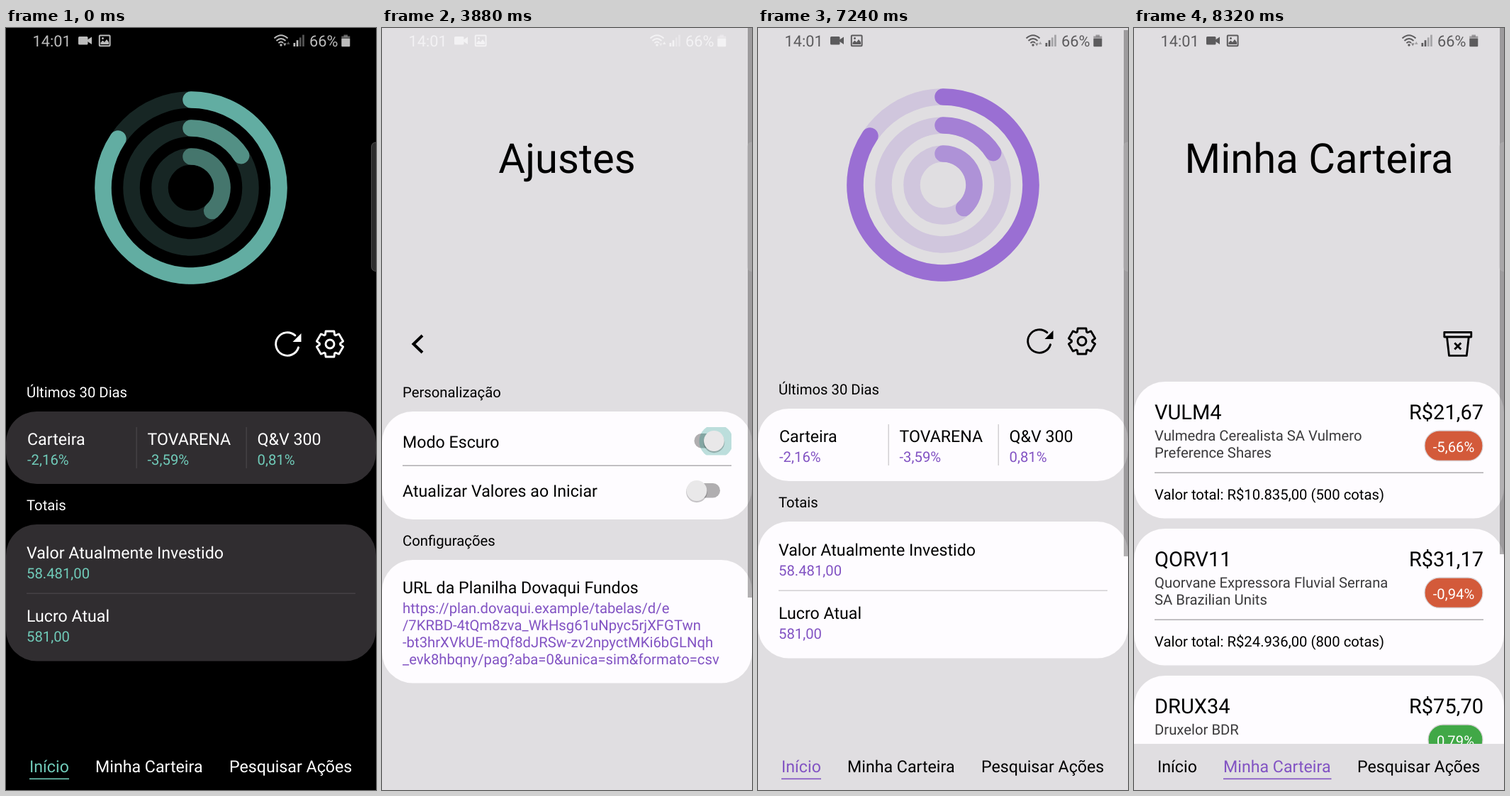
Write an HTML page that moves like this. It is 522 by 1073 pixels and loops after 9080 ms.

```html
<!DOCTYPE html>
<html lang="pt-BR">
<head>
<meta charset="utf-8">
<style>
html, body { margin: 0; width: 100%; height: 100%; overflow: hidden; background: #000; }
svg { display: block; width: 100vw; height: 100vh; font-family: Roboto, sans-serif; text-rendering: geometricPrecision; }
</style>
</head>
<body>
<svg id="stage" viewBox="0 0 522 1073"></svg>
<script>
const LOOP = 9080, STEP = 40;
const S = 20.3, M = 23.2, L = 29, XL = 58;   // text sizes
const DARK = {
  bg: '#000', card: '#302d30', ink: '#fff', accent: '#70cbb9', line: '#464346', rule: '#777578',
  rings: ['#62ada2', '#539085', '#45766d'], track: '#172624', status: '#bcbcbc',
  slot: '#201f21', bar: 0.2
};
const LIGHT = {
  bg: '#e0dee1', card: '#fefcff', ink: '#000', accent: '#8253c3', line: '#cfcdd0', rule: '#a9a7aa',
  rings: ['#9a6fd3', '#a480d5', '#ae92d7'], track: '#d0c6dd', status: '#5c5b5d',
  slot: '#b0aeb0', bar: 0.3
};
const RINGS_FROM = [295.7, 63.7, 295.4], RINGS_TO = [303.8, 57.3, 137.7];
const stage = document.getElementById('stage');
let c = DARK;

const clamp = x => Math.max(0, Math.min(1, x));
const mix = (a, b, p) => a + (b - a) * p;
const polar = (x, y, r, deg) => {
  const a = deg * Math.PI / 180;
  return `${(x + r * Math.sin(a)).toFixed(2)},${(y - r * Math.cos(a)).toFixed(2)}`;
};

const text = (s, x, y, size, fill = c.ink, more = '') =>
  `<text x="${x}" y="${y}" font-size="${size}" fill="${fill}" ${more}>${s.replace(/&/g, '&amp;')}</text>`;
const rect = (x, y, w, h, fill, r = 0, more = '') =>
  `<rect x="${x}" y="${y}" width="${w}" height="${h}" rx="${r}" fill="${fill}" ${more}/>`;
const disc = (x, y, r, fill, more = '') => `<circle cx="${x}" cy="${y}" r="${r}" fill="${fill}" ${more}/>`;
const stroke = (d, w, color = c.ink, more = '') =>
  `<path d="${d}" fill="none" stroke="${color}" stroke-width="${w}" ${more}/>`;
const group = (s, dy) => `<g transform="translate(0 ${dy})">${s}</g>`;
const card = (y, h) => rect(0, y, 522, h, c.card, 43.5);
const rule = (y, color) => rect(29, y, 464, 1.4, color);
const scrollbar = (y, h) => rect(516, y, 6, h, '#000', 0, `opacity="${c.bar}"`);
const title = s => text(s, 261, 204, XL, c.ink, 'text-anchor="middle"');

function rings(p) {
  return c.rings.map((color, i) => {
    const r = 124 - 40 * i, end = mix(RINGS_FROM[i], RINGS_TO[i], p);
    const arc = `M261,${225 - r}A${r},${r} 0 ${end > 180 ? 1 : 0} 1 ${polar(261, 225, r, end)}`;
    return disc(261, 225, r, 'none', `stroke="${c.track}" stroke-width="23.5"`) +
      stroke(arc, 23.5, color, 'stroke-linecap="round"');
  }).join('');
}

function gear(x, y) {
  const pts = [];
  for (let a = 0; a < 360; a += 60)
    pts.push(polar(x, y, 14.6, a - 27), polar(x, y, 19, a - 18), polar(x, y, 19, a + 18), polar(x, y, 14.6, a + 27));
  return stroke(`M${pts.join('L')}Z`, 2.9, c.ink, 'stroke-linejoin="round"') +
    stroke(`M${x - 6},${y}a6,6 0 1 1 12,0a6,6 0 1 1 -12,0`, 2.9);
}

const refresh = () =>
  stroke(`M${polar(397, 445, 16.3, 107)}A16.3,16.3 0 1 1 ${polar(397, 445, 16.3, 42)}`, 2.9, c.ink, 'stroke-linecap="round"') +
  `<path d="M416.5,430V442H404.5Z" fill="${c.ink}"/>`;

function home(t, scroll) {
  const loaded = !(t >= 5680 && t < 5760);
  const values = loaded ? ['-2,16%', '-3,59%', '0,81%', '58.481,00', '581,00']
                        : ['0,00%', '-3,59%', '0,00%', '0,00', '0,00'];
  const p = t < 5680 ? 1 : clamp((t - 5720) / 120);
  const columns = ['Carteira', 'TOVARENA', 'Q&V 300'].map((name, i) => {
    const x = [30, 199.5, 354.5][i];
    return text(name, x, 587, M) + text(values[i], x, 615, S, c.accent) +
      (i ? rect(x - 16, 562, 1.4, 58, c.line) : '');
  }).join('');
  const page = rings(p) + refresh() + gear(457, 445) +
    text('Resumo', 29, 460, 36.25, c.ink, `opacity="${scroll ? clamp((t - 7400) / 200) : 0}"`) +
    text('Últimos 30 Dias', 29, 520, S) + card(540, 102) + columns +
    text('Totais', 29, 679, S) + card(699, 192.5) +
    text('Valor Atualmente Investido', 29, 747, M) + text(values[3], 29, 775, S, c.accent) +
    rule(795.5, c.line) +
    text('Lucro Atual', 29, 836, M) + text(values[4], 29, 864, S, c.accent);
  return group(page, -scroll) + (t < 2400 ? '' : scrollbar(scroll * 266 / 363, 741));
}

function toggle(y, pos, ripple = 0) {
  const x = mix(444, 473.5, pos), lit = pos === 1;
  const glow = ripple > 0
    ? `<clipPath id="rip"><rect x="420" y="${y - 20}" width="73" height="39.5"/></clipPath>` +
      disc(x + 3, y, 24, '#0f8f80', `opacity="${0.28 * ripple}" clip-path="url(#rip)"`) : '';
  return rect(440.5, y - 11, 36.5, 20.5, lit ? '#224844' : c.slot, 10.2) + glow +
    disc(x, y + 1.3, 14.9, '#000', 'opacity="0.22"') + disc(x, y - 0.5, 14.4, lit ? '#048576' : '#e9e8e9');
}

function settings(t) {
  const ease = (1 - Math.cos(Math.PI * clamp((t - 3812) / 250))) / 2;
  const pos = t < 3880 ? 1 : 1 - ease;
  const ripple = t < 3840 ? 0 : t < 3880 ? 0.6 : 1 - clamp((t - 3920) / 360);
  const link = [
    'https://plan.dovaqui.example/tabelas/d/e',
    '/7KRBD-4tQm8zva_WkHsg61uNpyc5rjXFGTwn',
    '-bt3hrXVkUE-mQf8dJRSw-zv2npyctMKi6bGLNqh',
    '_evk8hbqny/pag?aba=0&unica=sim&formato=csv'
  ];
  return title('Ajustes') + stroke('M57,433L44.5,445L57,457', 4) +
    text('Personalização', 29, 520, S) + card(540, 152) +
    text('Modo Escuro', 29, 591, M) + toggle(582, pos, ripple) + rule(615.5, c.rule) +
    text('Atualizar Valores ao Iniciar', 29, 660, M) + toggle(652, 0) +
    text('Configurações', 29, 729, S) + card(749, 173.5) +
    text('URL da Planilha Dovaqui Fundos', 29, 796, M) +
    link.map((s, i) => text(s, 29, 824 + 24 * i, S, c.accent)).join('') + scrollbar(0, 802);
}

const STOCKS = [
  ['VULM4', 'R$21,67', '-5,66%', 'Vulmedra Cerealista SA Vulmero', 'Preference Shares', 'R$10.835,00 (500 cotas)'],
  ['QORV11', 'R$31,17', '-0,94%', 'Quorvane Expressora Fluvial Serrana', 'SA Brazilian Units', 'R$24.936,00 (800 cotas)'],
  ['DRUX34', 'R$75,70', '0,79%', 'Druxelor BDR', '', '']
];

function stock([code, price, change, name, more, total]) {
  const down = change[0] === '-', w = down ? 82 : 77;
  return card(498, 192.5) + text(code, 29, 551, L) + text(price, 493, 551, L, c.ink, 'text-anchor="end"') +
    text(name, 29, 581, S, '#3b3a3c') + text(more, 29, 605, S, '#3b3a3c') +
    rect(492 - w, 567, w, 42.5, down ? '#d35a3a' : '#41a847', 21, 'stroke="#d9d3d6" stroke-width="1.3"') +
    text(change, 492 - w / 2, 597, S, '#fff', 'text-anchor="middle"') +
    (total ? rule(625.5, c.rule) + text('Valor total: ' + total, 29, 663.5, S) : '');
}

function wallet() {
  const bin = stroke('M437.8,428.5H475.8V435H437.8ZM441.5,435L444.5,461.3H469.3L472.3,435M452.3,443.5l9,9m0,-9l-9,9',
    2.8, c.ink, 'stroke-linejoin="round"');
  return title('Minha Carteira') + bin +
    STOCKS.map((s, i) => group(stock(s), 207 * i)).join('') + scrollbar(0, 741);
}

function nav(active) {
  return rect(0, 1008, 522, 65, c.bg) +
    [['Início', 33, 56], ['Minha Carteira', 126, 152.5], ['Pesquisar Ações', 315, 174]].map(([s, x, w], i) =>
      text(s, x, 1047.5, M, i === active ? c.accent : c.ink) +
      (i === active ? rect(x, 1056.5, w, 1.6, c.accent) : '')).join('');
}

function status(t) {
  const k = t >= 3880 && t < 4000 ? '#f3f2f4' : c.status;
  const fill = (d, o = 1) => `<path d="${d}" fill="${k}" opacity="${o}"/>`;
  const bars = [0, 1, 2, 3].map(i =>
    rect(405.5 + 4.2 * i, 21 - 3.8 * i, 2.7, 5 + 3.8 * i, k, 0, `opacity="${i < 2 ? 1 : 0.45}"`)).join('');
  return text('14:01', 37.5, 26, 21.75, k) +
    rect(102, 12, 13.5, 11.5, k, 1.5) + fill('M115,16.5L121,12.5V23L115,19Z') +
    rect(131.8, 10.4, 14.8, 14.8, 'none', 1, `stroke="${k}" stroke-width="2"`) +
    fill('M133.5,23V20.5L136.5,17.5L139,20L142,16L145,20V23Z') + disc(136.5, 14.5, 1.5, k) +
    stroke('M378.5,14.5Q388,6 397.5,14.5M381.5,18Q388,12 394.5,18M384.5,21.2Q388,18 391,21', 1.9, k) + disc(388, 24, 1.7, k) +
    fill('M391,21.5H395.6L393.3,25.5Z', t < 1040 ? 0.9 : 0.7) +
    fill('M396,23L398.3,19L400.6,23Z', t >= 1040 && t < 5080 ? 0.9 : 0.45) + bars +
    text('66%', 428, 26, 21.75, k) +
    rect(476.5, 9.5, 5.5, 3, k, 0, 'opacity="0.5"') + rect(473.3, 11.5, 12, 5, k, 0, 'opacity="0.5"') +
    rect(473.3, 15, 12, 11.3, k, 1);
}

const handle = () =>
  rect(515.5, 161, 20, 181.5, '#cdcdcd', 6, 'fill-opacity="0.22" stroke="#bbb" stroke-opacity="0.3" stroke-width="1"');

function draw(t) {
  c = t < 3880 ? DARK : LIGHT;
  const scroll = t < 7240 ? 0 : Math.round(363 * clamp((t - 7200) / 360) ** 2.03);
  let page;
  if (t >= 2400 && t < 5680) page = settings(t);
  else if (t >= 8000) page = wallet() + nav(1);
  else page = home(t, scroll) + nav(0);
  stage.innerHTML = rect(0, 0, 522, 1073, c.bg) + page + handle() + status(t);
}

const start = performance.now();
let last = -1;
function tick() {
  const t = Math.floor((performance.now() - start) % LOOP / STEP) * STEP;
  if (t !== last) draw(last = t);
  requestAnimationFrame(tick);
}
tick();
</script>
</body>
</html>
```
